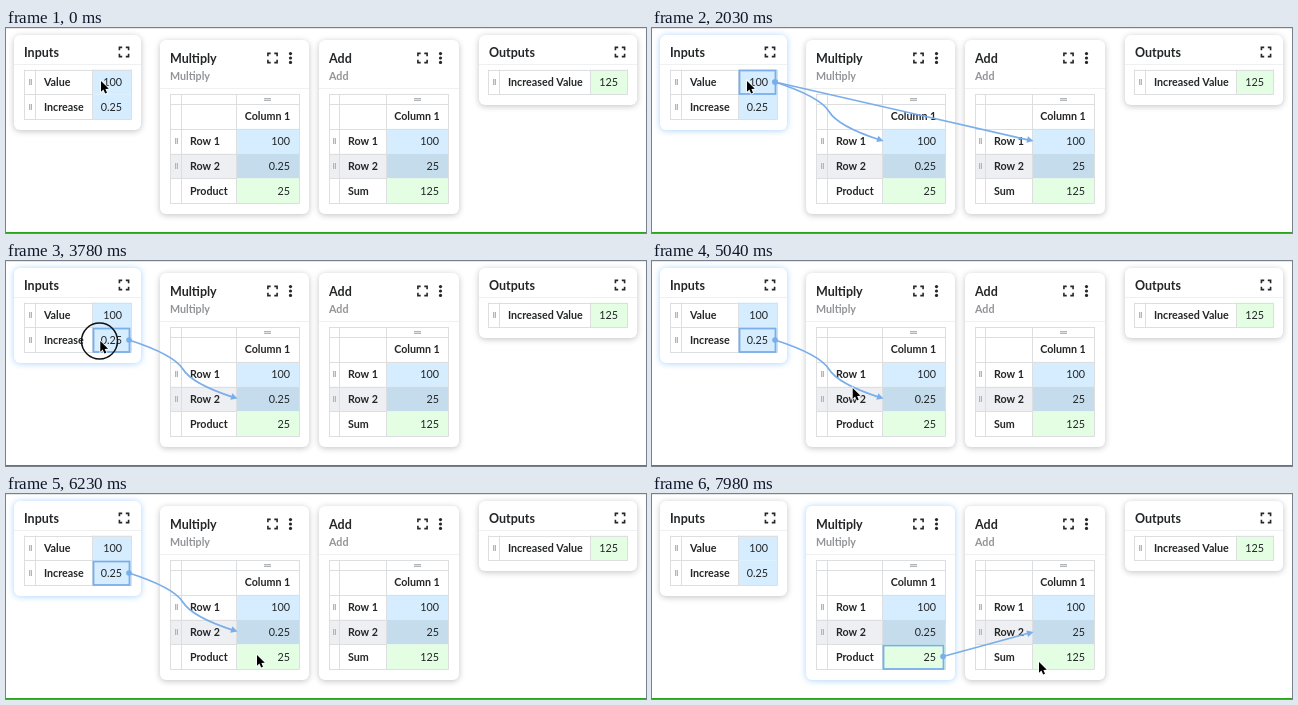
Write an HTML page with a canvas that moves like this. It is 640x205 px and loops after 8 s.

```html
<!DOCTYPE html>
<html lang="en">
<head>
<meta charset="utf-8">
<title>Linked cells</title>
<style>
  html, body { margin: 0; width: 100%; height: 100%; overflow: hidden; background: #fff; }
  canvas { display: block; width: 640px; height: 205px; }
</style>
</head>
<body>
<canvas id="stage"></canvas>
<script>
const W = 640, H = 205, LOOP = 8000, STEP = 70;
const canvas = document.getElementById('stage');
const ctx = canvas.getContext('2d');
const dpr = window.devicePixelRatio || 1;
canvas.width = W * dpr;
canvas.height = H * dpr;

const FONT = 'Lato, "Open Sans", sans-serif';
const INK = '#242628', LINE = '#dcdee0', BLUE = '#7aaeea', ROW = 24.8;
const FILL = { in: '#d5edfe', alt: '#c4dcec', out: '#e3fee3' };

const cards = [
  { x: 8, y: 7, w: 127, h: 95, title: 'Inputs', tableX: 18, labelX: 29, valueX: 86, endX: 125,
    rows: [['Value', '100', 'in'], ['Increase', '0.25', 'in']] },
  { x: 154, y: 12, w: 149, h: 174, title: 'Multiply', column: 'Column 1',
    tableX: 164, labelX: 175, valueX: 230, endX: 293,
    rows: [['Row 1', '100', 'in'], ['Row 2', '0.25', 'alt'], ['Product', '25', 'out']] },
  { x: 313, y: 12, w: 140, h: 174, title: 'Add', column: 'Column 1',
    tableX: 323, labelX: 333, valueX: 380, endX: 442,
    rows: [['Row 1', '100', 'in'], ['Row 2', '25', 'alt'], ['Sum', '125', 'out']] },
  { x: 473, y: 7, w: 158, h: 70, title: 'Outputs', tableX: 482, labelX: 493, valueX: 584, endX: 621,
    rows: [['Increased Value', '125', 'out']] }
];

// Each selection: time span, card, cell box, and links as start, end, bent or straight
const selections = [
  { from: 1400, to: 3640, card: 0, cell: [87, 42.5, 37, 23.5], links: [
    [123, 54, 231, 113, true], [123, 54, 381, 113, false]] },
  { from: 3640, to: 6370, card: 0, cell: [87, 67.5, 37, 23.5], links: [
    [123, 79, 231, 137.5, true]] },
  { from: 6370, to: LOOP, card: 1, cell: [231, 151.5, 61, 23.5], links: [
    [291, 162.5, 381, 138, false]] }
];

const clicks = [[1330, 1540], [3570, 3850], [6300, 6510]];

const easeIn = u => u * u;
const easeOut = u => 1 - (1 - u) * (1 - u);
const smooth = u => u * u * (3 - 2 * u);

// Pointer path: start, end, from point, to point, easing
const moves = [
  [2170, 2730, 95, 53, 96.3, 75, smooth],
  [2870, 3220, 96.3, 75, 94.3, 80, smooth],
  [4550, 5040, 94.3, 80, 200.7, 127, easeIn],
  [5040, 5530, 200.7, 127, 251, 161, easeOut],
  [7210, 7980, 251, 161, 387, 168, smooth]
];

function pointerAt(t) {
  let pos = [95, 53];
  for (const [start, end, x0, y0, x1, y1, ease] of moves) {
    if (t < start) break;
    const u = ease(Math.min(1, (t - start) / (end - start)));
    pos = [x0 + (x1 - x0) * u, y0 + (y1 - y0) * u];
  }
  return pos;
}

function rect(x, y, w, h, color) {
  ctx.fillStyle = color;
  ctx.fillRect(x, y, w, h);
}

function text(str, x, y, size, weight = 700, align = 'left', color = INK) {
  ctx.font = `${weight} ${size}px ${FONT}`;
  ctx.textAlign = align;
  ctx.fillStyle = color;
  ctx.fillText(str, x, y);
}

function path(points, color, width, close) {
  ctx.beginPath();
  points.forEach(([x, y], i) => i ? ctx.lineTo(x, y) : ctx.moveTo(x, y));
  if (close) ctx.closePath();
  ctx.strokeStyle = color;
  ctx.lineWidth = width;
  ctx.stroke();
}

function disc(x, y, r, color) {
  ctx.beginPath();
  ctx.arc(x, y, r, 0, Math.PI * 2);
  ctx.fillStyle = color;
  ctx.fill();
}

function expandIcon(x, y) {
  for (const sx of [-1, 1]) for (const sy of [-1, 1]) {
    path([[x + sx * 1.8, y + sy * 4.6], [x + sx * 4.6, y + sy * 4.6], [x + sx * 4.6, y + sy * 1.8]], INK, 1.6);
  }
}

function grip(x, y, w, h) {
  const left = Math.round(x - w / 2), top = Math.round(y - h / 2);
  rect(left, top, w, h, '#b2b5b8');
  if (w < h) rect(left + 1, top, 1, h, '#dfe1e3');
  else rect(left, top + 1, w, 1, '#dfe1e3');
}

function cardBox(card, glow) {
  ctx.save();
  ctx.beginPath();
  ctx.roundRect(card.x, card.y, card.w, card.h, 6);
  ctx.fillStyle = '#fff';
  ctx.shadowColor = glow ? 'rgba(110,180,255,0.6)' : 'rgba(0,0,0,0.24)';
  ctx.shadowBlur = 6 * dpr;
  ctx.shadowOffsetY = (glow ? 0.5 : 1.2) * dpr;
  ctx.fill();
  ctx.restore();
}

function drawTable(card) {
  const { tableX, labelX, valueX, endX, rows, column } = card;
  const top = column ? 100.8 : 41.6;
  const bottom = top + rows.length * ROW;
  const width = endX - tableX;
  const head = column ? 66 : top;

  rows.forEach(([label, value, kind], i) => {
    const y = top + i * ROW;
    if (kind === 'alt') rect(tableX, y, valueX - tableX, ROW, '#eeeff2');
    rect(valueX, y, endX - valueX, ROW, FILL[kind]);
  });

  const lines = rows.map((r, i) => top + i * ROW).concat(bottom);
  if (column) lines.push(66, 76);
  for (const y of lines) {
    const inside = y > top && y < bottom;
    rect(tableX, Math.round(y), inside ? valueX - tableX : width, 1, LINE);
  }
  for (const x of [tableX, labelX, valueX, endX]) rect(x, head, 1, bottom - head + 0.5, LINE);

  rows.forEach(([label, value, kind], i) => {
    const mid = top + (i + 0.5) * ROW;
    if (!column || kind !== 'out') grip((tableX + labelX) / 2 + 0.5, mid, 3, 6);
    text(label, labelX + 9, mid + 3.8, 10.7);
    text(value, endX - 8.9, mid + 3.8, 10.8, 400, 'right');
  });

  if (column) {
    const mid = (valueX + endX) / 2;
    grip(mid, 71, 7, 3);
    text(column, mid, 92, 10.7, 700, 'center');
  }
}

function drawCard(card, glow) {
  cardBox(card, glow);
  const right = card.x + card.w;
  const mid = card.y + (card.column ? 18 : 17);
  text(card.title, card.x + 10, mid + 4.7, 12.5);
  if (card.column) {
    text(card.title, card.x + 10, 52.3, 10.7, 700, 'left', '#929497');
    expandIcon(right - 36.5, mid);
    for (const dy of [-4.4, 0, 4.4]) disc(right - 18.5, mid + dy, 1.6, INK);
  } else {
    expandIcon(right - 17, mid);
  }
  rect(card.x, card.column ? 60 : 36, card.w, 1, '#eff0f2');
  drawTable(card);
}

function drawLink([x0, y0, x1, y1, bent]) {
  const dx = x1 - x0, dy = y1 - y0;
  // A bent link runs gently to a knee, then drops steeply through the middle
  const kneeX = bent ? dx * 0.417 : dx / 4;
  const kneeY = dy / 4;
  const angle = Math.atan2(kneeY, kneeX);
  ctx.beginPath();
  ctx.moveTo(x0, y0);
  ctx.quadraticCurveTo(x0 + kneeX, y0 + kneeY, x0 + dx / 2, y0 + dy / 2);
  ctx.quadraticCurveTo(x1 - kneeX, y1 - kneeY, x1 - 3 * Math.cos(angle), y1 - 3 * Math.sin(angle));
  ctx.strokeStyle = BLUE;
  ctx.lineWidth = 1.7;
  ctx.stroke();
  disc(x0, y0, 2.8, BLUE);

  ctx.save();
  ctx.translate(x1 + 0.5, y1);
  ctx.rotate(angle);
  ctx.beginPath();
  ctx.moveTo(0, 0);
  ctx.lineTo(-6.5, -3.3);
  ctx.lineTo(-6.5, 3.3);
  ctx.fillStyle = BLUE;
  ctx.fill();
  ctx.restore();
}

function drawArrowPointer(x, y) {
  const shape = [[0, 0], [0, 10.8], [2.4, 8.6], [4.2, 12.6], [6, 11.8], [4.4, 7.9], [7.8, 7.8]]
    .map(([dx, dy]) => [x + dx, y + dy]);
  path(shape, 'rgba(255,255,255,0.85)', 1.6, true);
  ctx.fillStyle = '#000';
  ctx.fill();
}

function drawTextPointer(x, y) {
  const strokes = [
    [[x, y - 5], [x, y + 5]],
    [[x - 2.8, y - 6], [x, y - 5], [x + 2.8, y - 6]],
    [[x - 2.8, y + 6], [x, y + 5], [x + 2.8, y + 6]]
  ];
  strokes.forEach(s => path(s, '#fff', 2.6));
  strokes.forEach(s => path(s, '#222', 1.4));
}

function draw(t) {
  ctx.setTransform(dpr, 0, 0, dpr, 0, 0);
  rect(0, 0, W, H, '#fff');
  rect(0, 0, W, 1, '#e6e6e6');
  rect(0, 204, W, 1, '#2aa51c');

  const active = selections.find(s => t >= s.from && t < s.to);
  cards.forEach((card, i) => drawCard(card, active && active.card === i));

  if (active) {
    const [x, y, w, h] = active.cell;
    ctx.strokeStyle = BLUE;
    ctx.lineWidth = 1.8;
    ctx.strokeRect(x + 0.5, y, w - 1, h);
    ctx.globalAlpha = Math.min(1, (t - active.from + STEP) / 210);
    active.links.forEach(drawLink);
    ctx.globalAlpha = 1;
  }

  const [px, py] = pointerAt(t);
  if (t >= 2590 && t < 2940) drawTextPointer(px, py);
  else drawArrowPointer(px, py);

  if (clicks.some(([from, to]) => t >= from && t < to)) {
    ctx.beginPath();
    ctx.arc(px - 0.8, py, 18, 0, Math.PI * 2);
    ctx.strokeStyle = '#111';
    ctx.lineWidth = 1.5;
    ctx.stroke();
  }
}

const start = performance.now();
function tick() {
  const t = (performance.now() - start) % LOOP;
  draw(Math.floor(t / STEP) * STEP);
  requestAnimationFrame(tick);
}
tick();
</script>
</body>
</html>
```
